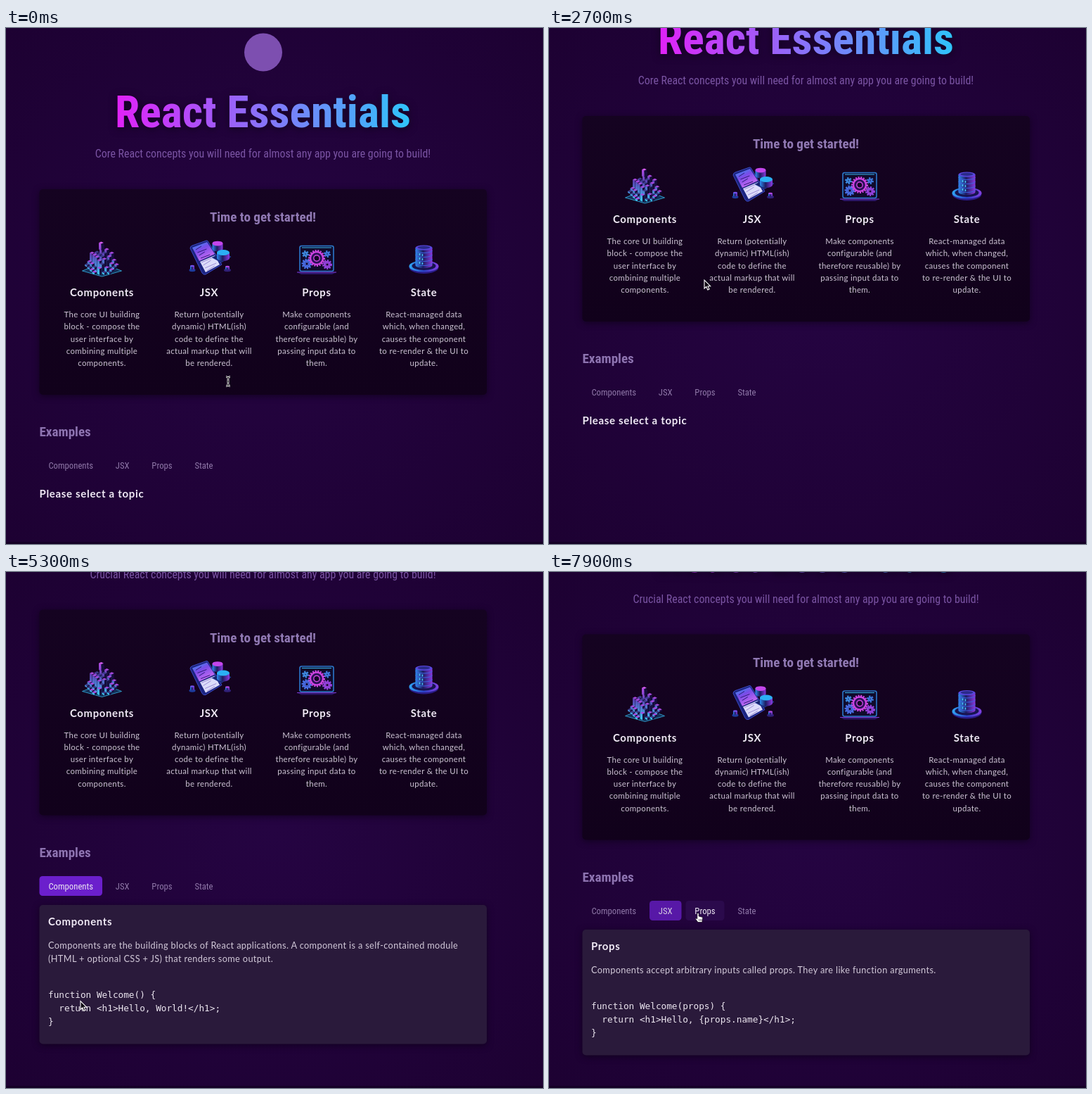
Recreate the animation shown at these times as an HTML page. Size 764 by 733 pixels, loop 8 s.

```html
<!DOCTYPE html>
<html lang="en">
<head>
<meta charset="utf-8">
<title>React Essentials</title>
<style>
  html, body { margin: 0; width: 100%; height: 100%; overflow: hidden; background: #1f0236; }
  svg { display: block; width: 764px; height: 733px; }
  text { white-space: pre; }
  .head { font-family: "Roboto Condensed", Roboto, sans-serif; font-stretch: 75%; }
  .loose .head { letter-spacing: -.055em; }
  .body { font-family: Lato, sans-serif; letter-spacing: .029em; }
  .strong { font-family: Lato, sans-serif; font-weight: 700; letter-spacing: .045em; }
  .code { font-family: "DejaVu Sans Mono", monospace; }
  .title { filter: drop-shadow(0 2px 6px rgba(10, 0, 20, .7)); }
  .raised { filter: drop-shadow(0 2px 5px rgba(5, 0, 12, .55)); }
</style>
</head>
<body>
<svg id="stage" viewBox="0 0 764 733">
  <defs>
    <radialGradient id="sky" cx=".5" cy=".5" r=".72">
      <stop offset="0" stop-color="#250442"/><stop offset="1" stop-color="#1d0132"/>
    </radialGradient>
    <linearGradient id="neon" gradientUnits="userSpaceOnUse" x1="157" x2="575" y1="0" y2="0">
      <stop stop-color="#e022f8"/><stop offset="1" stop-color="#2fc4fb"/>
    </linearGradient>
    <linearGradient id="night" x2="0" y2="1">
      <stop stop-color="#150321"/><stop offset="1" stop-color="#11011b"/>
    </linearGradient>
    <linearGradient id="tower" gradientUnits="userSpaceOnUse" x1="0" x2="0" y1="2" y2="48">
      <stop stop-color="#c24cf0"/><stop offset=".4" stop-color="#5a45b8"/><stop offset="1" stop-color="#3cc8f2"/>
    </linearGradient>
    <linearGradient id="display" x2=".6" y2="1">
      <stop stop-color="#2a9cf0"/><stop offset=".45" stop-color="#7a4be8"/><stop offset="1" stop-color="#d070f4"/>
    </linearGradient>
    <linearGradient id="drum">
      <stop stop-color="#2f8cf0"/><stop offset=".45" stop-color="#1d1c62"/><stop offset="1" stop-color="#8a3be0"/>
    </linearGradient>
    <linearGradient id="brim">
      <stop stop-color="#2fa8f4"/><stop offset=".5" stop-color="#2b40c8"/><stop offset="1" stop-color="#8440e0"/>
    </linearGradient>
  </defs>
  <rect width="764" height="733" fill="url(#sky)"/>
  <g id="page"></g>
  <rect y="730" width="764" height="3" fill="#100020" opacity=".65"/>
  <g id="cursor"></g>
</svg>
<script>
const LOOP = 8000;
const LEFT = 47.5, WIDTH = 636.5, MIDDLE = 365.5;
const LIGHT = [236, 230, 242], DIM = [143, 120, 168], DARK = [21, 3, 33], PURPLE = [107, 31, 204];
const $ = id => document.getElementById(id);

const escape = s => s.replace(/&/g, '&amp;').replace(/</g, '&lt;');
const text = (s, x, y, size, fill, kind, more = '') =>
  `<text class="${kind}" x="${x}" y="${y}" font-size="${size}" fill="${fill}" ${more}>${escape(s)}</text>`;
const centred = 'text-anchor="middle" ', bold = 'font-weight="700" ';
const shape = (d, fill, stroke = 'none', width = 1) =>
  `<path d="${d}" fill="${fill}" stroke="${stroke}" stroke-width="${width}"/>`;
const ellipse = (x, y, rx, ry, fill, more = '') =>
  `<ellipse cx="${x}" cy="${y}" rx="${rx}" ry="${ry}" fill="${fill}" ${more}/>`;
const range = n => [...Array(n).keys()];

// Icons are drawn around x = 0, in a strip from y = 0 to y = 50.
function block(x, foot, tall, roof) {
  const top = foot - tall;
  return shape(`M${x - 3.4} ${top}V${foot - 1.6}L${x} ${foot}V${top + 1.6}Z`, 'url(#tower)')
    + shape(`M${x + 3.4} ${top}V${foot - 1.6}L${x} ${foot}V${top + 1.6}Z`, '#150d3c')
    + shape(`M${x - 3.4} ${top}l3.4 -1.6l3.4 1.6l-3.4 1.6Z`, roof);
}

function city() {
  let out = shape('M-28 43L0 32L28 43L0 51Z', '#123058', '#35b4e4', .8);
  for (let row = 0; row < 6; row++) {
    const count = 7 - Math.abs(row - 2);
    for (let i = 0; i < count; i++) {
      const x = (i - (count - 1) / 2) * 7;
      const uneven = (row * 5 + i * 3) % 4;
      const tall = Math.max(4, 30 - Math.abs(x) * 1.1 - row * 3.2 - uneven * 2);
      out += block(x, 33 + row * 3.2 - Math.abs(x) * .08, tall, uneven < 2 ? '#a848e0' : '#3d3c8c');
    }
  }
  return out + block(-1, 14, 11, '#d65cf4');
}

const drum = (x, y, r, h, lid) =>
  shape(`M${x - r} ${y}v${h}a${r} ${r * .45} 0 0 0 ${2 * r} 0v${-h}Z`, 'url(#drum)') + ellipse(x, y, r, r * .45, lid);

function tablet() {
  const lines = range(4).map(i => shape(`M${-11 + i * 2.6} ${31 + i * 4}l${i % 2 ? 11 : 16} -7`, 'none', '#8a78cc', .8)).join('');
  const rows = range(4).map(i => shape(`M${-19 + i * 2.4} ${13 + i * 4}l${i % 2 ? 13 : 8} -5`, 'none', '#2b1a78', 1)).join('');
  return shape('M-27 11Q-27 8 -24 7L-4 0Q-2 -.5 -1 2L18 34L-5 48Q-8 49 -10 46Z', '#1b2480', '#4657dc', .8)
    + shape('M-24 10L-3 2L8 19L-14 29Z', 'url(#display)') + rows
    + shape('M-13 30L8 21L15 34L-5 45Z', '#dcdcfa') + lines
    + shape('M4 24L18 17L31 23L17 31Z', '#16246c', '#3150c0', .6)
    + drum(12, 4, 7.5, 8, '#c446ec') + drum(20, 17, 9, 8, '#2bb0f4')
    + ellipse(-24, 42, 4.5, 2.2, '#1d3b9c') + drum(-24, 36, 3, 4, '#7350ee')
    + ellipse(26, 42, 5, 2.2, '#302078') + drum(26, 37, 3, 3, '#b04ae4');
}

const gear = (x, y, r, colour) =>
  ellipse(x, y, r, r, 'none', `stroke="${colour}" stroke-width="3" stroke-dasharray="2 1.6"`)
  + ellipse(x, y, r - 1.5, r - 1.5, '#2a1058', `stroke="${colour}" stroke-width="2.4"`)
  + ellipse(x, y, r * .4, r * .4, '#140828', `stroke="${colour}" stroke-width="1.4"`);

function screen() {
  return `<rect x="-24" y="7.5" width="48" height="36" rx="2.5" fill="#100b2c" stroke="#2b78cc" stroke-width="1.6"/>`
    + shape('M-21 10H21', 'none', '#38b8ee', 1.2)
    + gear(-14, 33, 6, '#4a70e8') + gear(15, 34, 5.5, '#9442dc') + gear(-16, 19, 3.5, '#3e8ae0')
    + gear(15, 19, 3.5, '#3e78dc') + gear(0, 25, 10.5, '#cc44e0')
    + shape('M-28 45H28L22 48H-22Z', '#2c1466') + shape('M-28 45H28', 'none', '#7d3cd0', 1);
}

function stack() {
  const bands = range(4).map(i => shape(`M-12 ${14 + i * 6}a12 3.5 0 0 0 24 0`, 'none', '#3f62e4', 1)).join('');
  return ellipse(0, 38, 21, 9, '#2a1c88') + ellipse(0, 36.5, 21, 8, 'url(#brim)') + ellipse(0, 36, 17, 6, '#171450')
    + shape('M-12 10v25a12 4 0 0 0 24 0v-25Z', 'url(#drum)') + bands
    + ellipse(0, 10, 12, 3.6, '#5a48e0') + ellipse(0, 9.8, 9, 2.2, '#2a2a8a')
    + shape('M-6 18v3M-6 24v3M-6 30v3M-2 19v3M-2 25v3M-2 31v3', 'none', '#4cc4fa', 1.6);
}

const cards = [
  [136.5, 'Components', city, ['The core UI building', 'block - compose the', 'user interface by', 'combining multiple', 'components.']],
  [289, 'JSX', tablet, ['Return (potentially', 'dynamic) HTML(ish)', 'code to define the', 'actual markup that will', 'be rendered.']],
  [442, 'Props', screen, ['Make components', 'configurable (and', 'therefore reusable) by', 'passing input data to', 'them.']],
  [594.5, 'State', stack, ['React-managed data', 'which, when changed,', 'causes the component', 'to re-render & the UI to', 'update.']]
];

// Times at which a tab is hovered, chosen and left again.
const tabs = [
  { name: 'Components', x: 47.5, w: 89.5, hover: 3950, on: 4390, off: 6500, word: 'Crucial',
    about: ['Components are the building blocks of React applications. A component is a self-contained module',
      '(HTML + optional CSS + JS) that renders some output.'],
    code: ['function Welcome() {', '  return <h1>Hello, World!</h1>;', '}'] },
  { name: 'JSX', x: 143, w: 45.5, hover: 6200, on: 6500, off: 7825, word: 'Fundamental',
    about: ['JSX is a syntax extension to JavaScript. It is similar to a template language, but it has full power of',
      'JavaScript (e.g., it may output dynamic content).'],
    code: ['<div>', '  <h1>Welcome {userName}</h1>', '  <p>Time to learn React!</p>', '</div>'] },
  { name: 'Props', x: 194.5, w: 55, hover: 7500, on: 7825, off: LOOP, word: 'Crucial',
    about: ['Components accept arbitrary inputs called props. They are like function arguments.'],
    code: ['function Welcome(props) {', '  return <h1>Hello, {props.name}</h1>;', '}'] },
  { name: 'State', x: 255.5, w: 52, hover: LOOP, on: LOOP, off: LOOP }
];

function card([x, name, icon, lines]) {
  return `<g transform="translate(${x} 302)">${icon()}</g>`
    + text(name, x, 381, 14.9, '#f0eaf5', 'strong', centred)
    + lines.map((s, i) => text(s, x, 411 + i * 17.25, 11.46, '#ccc4d3', 'body', centred)).join('');
}

function panel(tab, i) {
  const codeTop = 742 + tab.about.length * 19;
  const height = codeTop + (tab.code.length - 1) * 19 + 28 - 648.5;
  return `<g id="panel${i}"><rect class="raised" x="${LEFT}" y="648.5" width="${WIDTH}" height="${height}" rx="5" fill="#2a1a3b"/>`
    + text(tab.name, 60, 677, 14.9, '#f0eaf5', 'strong')
    + tab.about.map((s, k) => text(s, 60, 710 + k * 19, 12.73, '#d2c9d9', 'body')).join('')
    + tab.code.map((s, k) => text(s, 60, codeTop + k * 19, 12.73, '#ece6f0', 'code')).join('') + '</g>';
}

$('page').innerHTML =
  ellipse(366, 34.5, 27, 27, '#7d4fb0')
  + text('React Essentials', MIDDLE, 140.5, 63.7, 'url(#neon)', 'head title', centred + bold + 'id="title"')
  + text('', MIDDLE, 184, 15.9, '#7a54a3', 'head', centred + 'id="intro"')
  + `<rect class="raised" x="${LEFT}" y="229" width="${WIDTH}" height="292" rx="5" fill="url(#night)"/>`
  + text('Time to get started!', MIDDLE, 275, 19.1, '#9079b3', 'head', centred + bold)
  + cards.map(card).join('')
  + text('Examples', LEFT, 580, 19.1, '#8d73b0', 'head', bold)
  + tabs.map((tab, i) => `<rect id="tab${i}" x="${tab.x}" y="607.5" width="${tab.w}" height="28" rx="4.5"/>`
    + text(tab.name, tab.x + tab.w / 2, 626, 12.73, '', 'head', centred + `id="label${i}"`)).join('')
  + text('Please select a topic', LEFT, 666.5, 15, '#f0eaf5', 'strong', 'id="prompt"')
  + tabs.slice(0, 3).map(panel).join('');

// Tighten the tracking where no condensed face is available.
if ($('title').getComputedTextLength() > 445) $('stage').classList.add('loose');

const beam = 'M-3 -6.5Q0 -6.5 0 -4.5Q0 -6.5 3 -6.5M0 -5V5M-3 6.5Q0 6.5 0 4.5Q0 6.5 3 6.5M-1.5 0H1.5';
const pointers = {
  beam: shape(beam, 'none', '#fff', 2.6) + shape(beam, 'none', '#111', .9),
  arrow: shape('M0 0V12L2.8 9.5L4.8 14L7 13L5 8.7H8.6Z', '#0c0610', '#fff', 1.1),
  hand: shape('M-1.2 1Q0 -.6 1.2 1V5L6 6.2Q7 6.6 6.8 8L6 11.5V13.5H0L-3.8 8.8Q-3.4 7.2 -1.2 8.6Z', '#fff', '#160a1e', .8)
    + shape('M1.5 9v2.8M3.4 9v2.8M5 9v2.8', 'none', '#160a1e', .6)
};

const scrollKeys = [[0, 0], [1800, 0], [1900, 97.3], [2300, 104], [2850, 104], [3600, 23], [3950, 5.7],
  [4600, 5.7], [5250, 175.5], [5600, 175.5], [6200, 165], [6550, 165], [6850, 148], [6950, 148], [7200, 140.5]];
const cursorKeys = [[0, 316, 502], [600, 316, 502], [1500, 221, 358], [2850, 221, 358], [3900, 106, 609.5],
  [5450, 106, 609.5], [6200, 166, 453], [6570, 166, 453], [6880, 207, 415], [7100, 207, 415], [7600, 212, 484]];
const pointerKeys = [[0, 'beam'], [1380, 'arrow'], [3850, 'hand'], [4680, 'arrow'], [6150, 'hand'], [6650, 'arrow'], [7480, 'hand']];

const clamp = v => Math.max(0, Math.min(1, v));
const mix = (a, b, p) => a + (b - a) * p;
const blend = (a, b, p) => `rgb(${a.map((v, i) => Math.round(mix(v, b[i], p)))})`;
const latest = (keys, t) => keys.findLastIndex(k => k[0] <= t);

function sample(keys, t) {
  const i = latest(keys, t), from = keys[i], to = keys[i + 1] || from;
  const p = clamp((t - from[0]) / (to[0] - from[0] || 1));
  return from.slice(1).map((v, k) => mix(v, to[k + 1], p * p * (3 - 2 * p)));
}

let pointer;
function render(t) {
  $('page').setAttribute('transform', `translate(0 ${-sample(scrollKeys, t)[0]})`);

  const chosen = tabs.findIndex(tab => t >= tab.on && t < tab.off);
  const word = chosen < 0 ? 'Core' : tabs[chosen].word;
  $('intro').textContent = `${word} React concepts you will need for almost any app you are going to build!`;
  $('prompt').style.display = chosen < 0 ? '' : 'none';

  tabs.forEach((tab, i) => {
    const since = (time, span) => clamp((t - time) / span);
    const visible = since(tab.hover, 150) * (1 - since(tab.off, 300));
    $('tab' + i).setAttribute('fill', blend(DARK, PURPLE, since(tab.on, 300)));
    $('tab' + i).setAttribute('opacity', visible);
    $('label' + i).setAttribute('fill', blend(DIM, LIGHT, visible));
    if (tab.code) $('panel' + i).style.display = i === chosen ? '' : 'none';
  });

  const kind = pointerKeys[latest(pointerKeys, t)][1];
  if (kind !== pointer) $('cursor').innerHTML = pointers[pointer = kind];
  $('cursor').setAttribute('transform', `translate(${sample(cursorKeys, t)})`);
}

function tick() {
  render(performance.now() % LOOP);
  requestAnimationFrame(tick);
}
tick();
</script>
</body>
</html>
```
